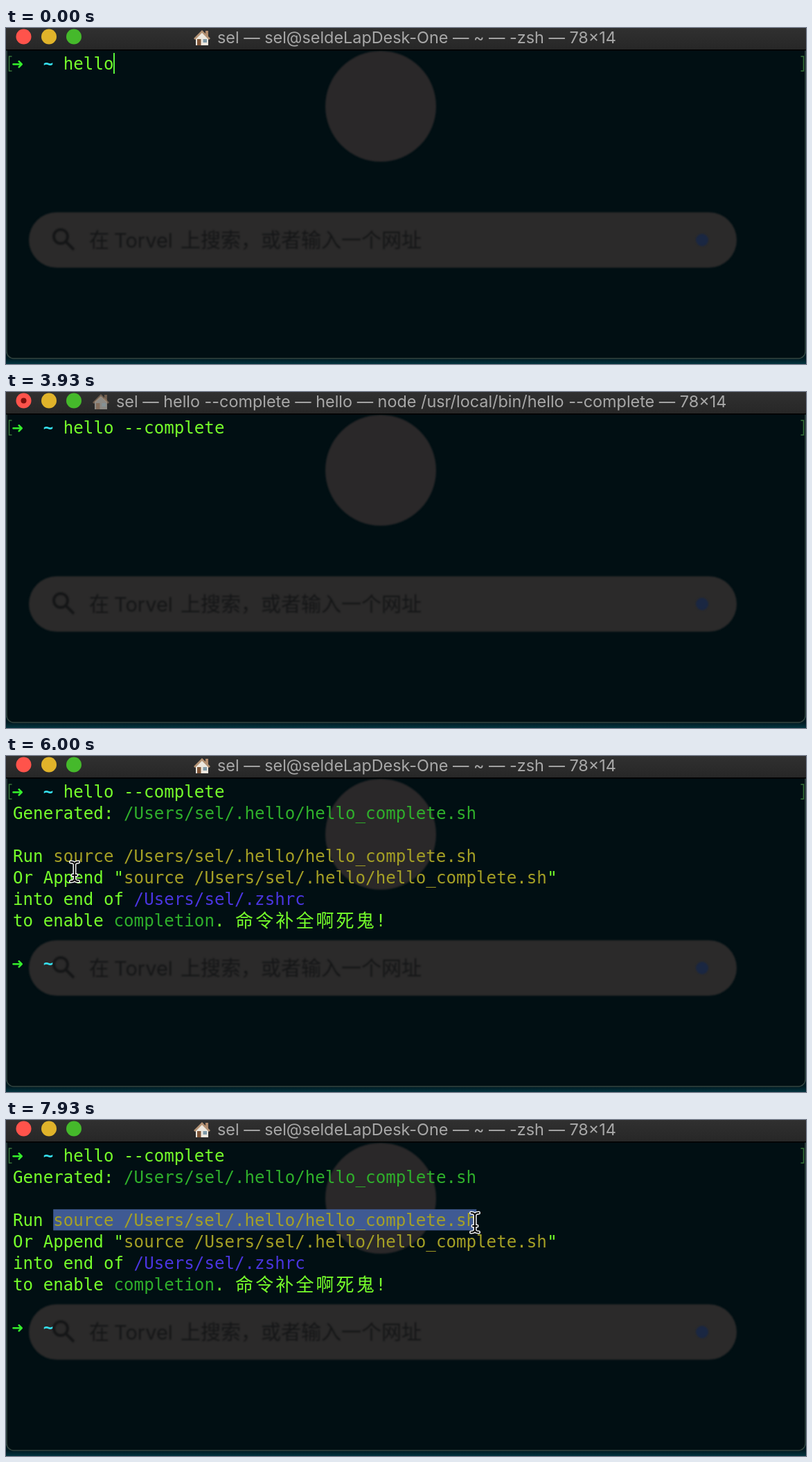
Animation of 1155 by 485 pixels, one loop 8000 ms. Source, as an HTML page with a canvas:

```html
<!DOCTYPE html>
<html lang="en">
<head>
<meta charset="utf-8">
<title>Terminal</title>
<style>
html, body { margin: 0; width: 100%; height: 100%; overflow: hidden; background: #03303c; }
canvas { display: block; }
</style>
</head>
<body>
<canvas id="stage" width="1155" height="485"></canvas>
<script>
const W = 1155, H = 485, LOOP = 8000;
const COL = 14.55, ROW = 30.95, LEFT = 10;
const MONO = '"DejaVu Sans Mono", monospace';
const CJK = '"Noto Sans CJK SC", "Noto Sans CJK", sans-serif';
const SANS = 'Inter, sans-serif';
const LIME = '#76ff2b', GREEN = '#2fb02b', YELLOW = '#a5a025', BLUE = '#4a35e0';
const USER = 'sel', HOST = 'seldeLapDesk-One';
const SCRIPT = `/Users/${USER}/.hello/hello_complete.sh`;
const COMMAND = 'hello --complete';

// When each character after "hello" is typed
const KEYS = [330, 670, 870, 1070, 1270, 1530, 1870, 2130, 2400, 2670, 2870];
const ENTER = 3270, OUTPUT = 4600, PROMPT = 5130;

const MOUSE = [
  [4730, 575, 113], [4870, 540, 119], [5600, 112, 172], [6000, 99, 167],
  [6600, 71, 150], [7070, 71, 149], [7780, 677, 148]
];

// Output rows: row number, then colour/text pairs
const LINES = [
  [1, LIME, 'Generated: ', GREEN, SCRIPT],
  [3, LIME, 'Run ', YELLOW, 'source ' + SCRIPT],
  [4, LIME, 'Or Append "', YELLOW, 'source ' + SCRIPT, LIME, '"'],
  [5, LIME, 'into end of ', BLUE, `/Users/${USER}/.zshrc`],
  [6, LIME, 'to enable ', GREEN, 'completion', LIME, '.']
];

const stage = document.getElementById('stage');
const ctx = stage.getContext('2d');
const colX = c => LEFT + c * COL;
const rowY = r => 36 + r * ROW;

function text(g, str, x, y, font, color) {
  g.font = font;
  g.fillStyle = color;
  g.fillText(str, x, y);
}

function disc(g, x, y, r, color) {
  g.fillStyle = color;
  g.beginPath();
  g.arc(x, y, r, 0, Math.PI * 2);
  g.fill();
}

function poly(g, color, ...p) {
  g.fillStyle = color;
  g.beginPath();
  for (let i = 0; i < p.length; i += 2) g.lineTo(p[i], p[i + 1]);
  g.fill();
}

function bracket(g, x, dir) {
  g.strokeStyle = '#38753a';
  g.lineWidth = 1.5;
  g.beginPath();
  g.moveTo(x + 4 * dir, 41);
  g.lineTo(x, 41);
  g.lineTo(x, 62);
  g.lineTo(x + 4 * dir, 62);
  g.stroke();
}

function makeBackdrop() {
  const c = document.createElement('canvas');
  c.width = W;
  c.height = H;
  const g = c.getContext('2d');
  g.fillStyle = '#03303c';
  g.fillRect(0, 0, W, H);
  const edge = g.createLinearGradient(0, 477, 0, H);
  edge.addColorStop(0, '#011a21');
  edge.addColorStop(1, '#03343f');
  g.fillStyle = edge;
  g.fillRect(0, 470, W, 15);

  g.beginPath();
  g.roundRect(1, -20, 1153, 497, 10);
  g.fillStyle = '#010f13';
  g.fill();
  g.strokeStyle = '#34443f';
  g.lineWidth = 1.5;
  g.stroke();

  // Dim page seen through the window
  g.filter = 'blur(0.8px)';
  disc(g, 541, 113, 80, '#2a2829');
  g.fillStyle = '#2b2a2a';
  g.beginPath();
  g.roundRect(33, 266, 1022, 80, 40);
  g.fill();
  const ink = '#151617';
  text(g, '在', 120, 317, '29px ' + CJK, ink);
  text(g, 'Torvel', 156, 317, '29px ' + SANS, ink);
  text(g, '上搜索，或者输入一个网址', 252, 317, '29px ' + CJK, ink);
  g.strokeStyle = ink;
  g.lineWidth = 4;
  g.beginPath();
  g.arc(79, 301, 10, 0, Math.PI * 2);
  g.moveTo(86, 308);
  g.lineTo(98, 320);
  g.stroke();
  disc(g, 1005, 306, 9, '#1a2742');
  g.filter = 'none';

  const bar = g.createLinearGradient(0, 0, 0, 31);
  bar.addColorStop(0, '#303030');
  bar.addColorStop(1, '#272727');
  g.fillStyle = bar;
  g.fillRect(0, 0, W, 31);
  g.fillStyle = '#000';
  g.fillRect(0, 31, W, 1.5);
  disc(g, 25.5, 12.5, 11, '#ff534b');
  disc(g, 62, 12.5, 11, '#e0b32a');
  disc(g, 98, 12.5, 11, '#45b92b');
  bracket(g, 4.5, 1);
  bracket(g, 1151.5, -1);
  return c;
}

function house(x, alpha) {
  ctx.save();
  ctx.globalAlpha = alpha;
  ctx.translate(x, 2);
  poly(ctx, '#b08a6c', 17, 2, 21, 2, 21, 11, 17, 8);
  poly(ctx, '#ece7de', 3, 12, 12, 4, 21, 12, 21, 23, 3, 23);
  poly(ctx, '#b39274', 0, 13, 12, 1, 24, 13, 22, 15, 12, 5, 2, 15);
  poly(ctx, '#7d5335', 5, 14, 10.5, 14, 10.5, 23, 5, 23);
  poly(ctx, '#7f9aa8', 13.5, 14, 19, 14, 19, 19, 13.5, 19);
  ctx.restore();
}

function titleBar(t) {
  const busy = t >= ENTER && t < PROMPT;
  const node = 'node /usr/local/bin/hello --complete';
  let words = [USER, `${USER}@${HOST}`, '~', '-zsh'];
  if (busy) words = t < OUTPUT
    ? [USER, COMMAND, 'hello', node]
    : [USER, `${USER}@${HOST}`, '~', node];
  const x = busy ? 125 : 271;
  house(x, busy ? 0.5 : 1);
  text(ctx, [...words, '78×14'].join(' — '), x + 34, 22, '23.4px ' + SANS, '#a8a8a8');
  if (busy) disc(ctx, 25.5, 12.5, 4, '#7d100c');
}

function mono(str, col, row, color, weight = '') {
  text(ctx, str, colX(col), rowY(row) + 24, `${weight} 24.17px ${MONO}`, color);
}

function prompt(row) {
  text(ctx, '➜', 8, rowY(row) + 23, 'bold 21px "DejaVu Sans", sans-serif', '#35ee2c');
  mono('~', 3, row, '#35dfec', 'bold');
}

function output() {
  for (const [row, ...runs] of LINES) {
    let col = 0;
    for (let i = 0; i < runs.length; i += 2) {
      mono(runs[i + 1], col, row, runs[i]);
      col += runs[i + 1].length;
    }
  }
  [...'命令补全啊死鬼'].forEach((ch, i) =>
    text(ctx, ch, colX(22 + 2 * i) + 1, rowY(6) + 25, '26px ' + CJK, LIME));
  mono('!', 36, 6, LIME);
}

function caret(t, typed) {
  const steady = t < ENTER || (t >= OUTPUT && t < PROMPT);
  const phase = t % 1000;
  if (!steady && (phase < 300 || phase >= 800)) return;
  let col = 5 + typed, row = 0;
  if (t >= PROMPT) [col, row] = [5, 8];
  else if (t >= OUTPUT) [col, row] = [0, 8];
  else if (t >= ENTER) [col, row] = [0, 1];
  ctx.fillStyle = '#57f53c';
  ctx.fillRect(colX(col) - 0.5, rowY(row), 2, 30);
}

function mouseAt(t) {
  if (t < MOUSE[0][0]) return null;
  for (let i = 1; i < MOUSE.length; i++) {
    const [t0, x0, y0] = MOUSE[i - 1], [t1, x1, y1] = MOUSE[i];
    if (t < t1) {
      const u = (t - t0) / (t1 - t0), k = u * u * (3 - 2 * u);
      return [x0 + (x1 - x0) * k, y0 + (y1 - y0) * k];
    }
  }
  return MOUSE[MOUSE.length - 1].slice(1);
}

function beam([x, y]) {
  ctx.lineCap = 'round';
  ctx.lineJoin = 'round';
  ctx.beginPath();
  for (const s of [-1, 1]) {
    ctx.moveTo(x - 5.5, y + 14 * s);
    ctx.quadraticCurveTo(x, y + 14 * s, x, y + 10 * s);
    ctx.quadraticCurveTo(x, y + 14 * s, x + 5.5, y + 14 * s);
  }
  ctx.moveTo(x, y - 10);
  ctx.lineTo(x, y + 10);
  ctx.moveTo(x - 3, y + 5);
  ctx.lineTo(x + 3, y + 5);
  for (const [color, width] of [['#f4f4f4', 5], ['#000', 2]]) {
    ctx.strokeStyle = color;
    ctx.lineWidth = width;
    ctx.stroke();
  }
}

const backdrop = makeBackdrop();

function draw(t) {
  const typed = 5 + KEYS.filter(k => t >= k).length;
  const mouse = mouseAt(t);
  ctx.drawImage(backdrop, 0, 0);
  titleBar(t);

  if (mouse && t > 7070) {
    const cols = Math.min(42, Math.round((mouse[0] - colX(4)) / COL));
    ctx.fillStyle = '#3f5a93';
    ctx.fillRect(colX(4), rowY(3), cols * COL, 30.5);
  }
  prompt(0);
  mono(COMMAND.slice(0, typed), 5, 0, LIME);
  if (t >= OUTPUT) output();
  if (t >= PROMPT) prompt(8);
  caret(t, typed);
  if (mouse) beam(mouse);
}

const start = performance.now();
function tick() {
  draw((performance.now() - start) % LOOP);
  requestAnimationFrame(tick);
}
tick();
</script>
</body>
</html>
```
